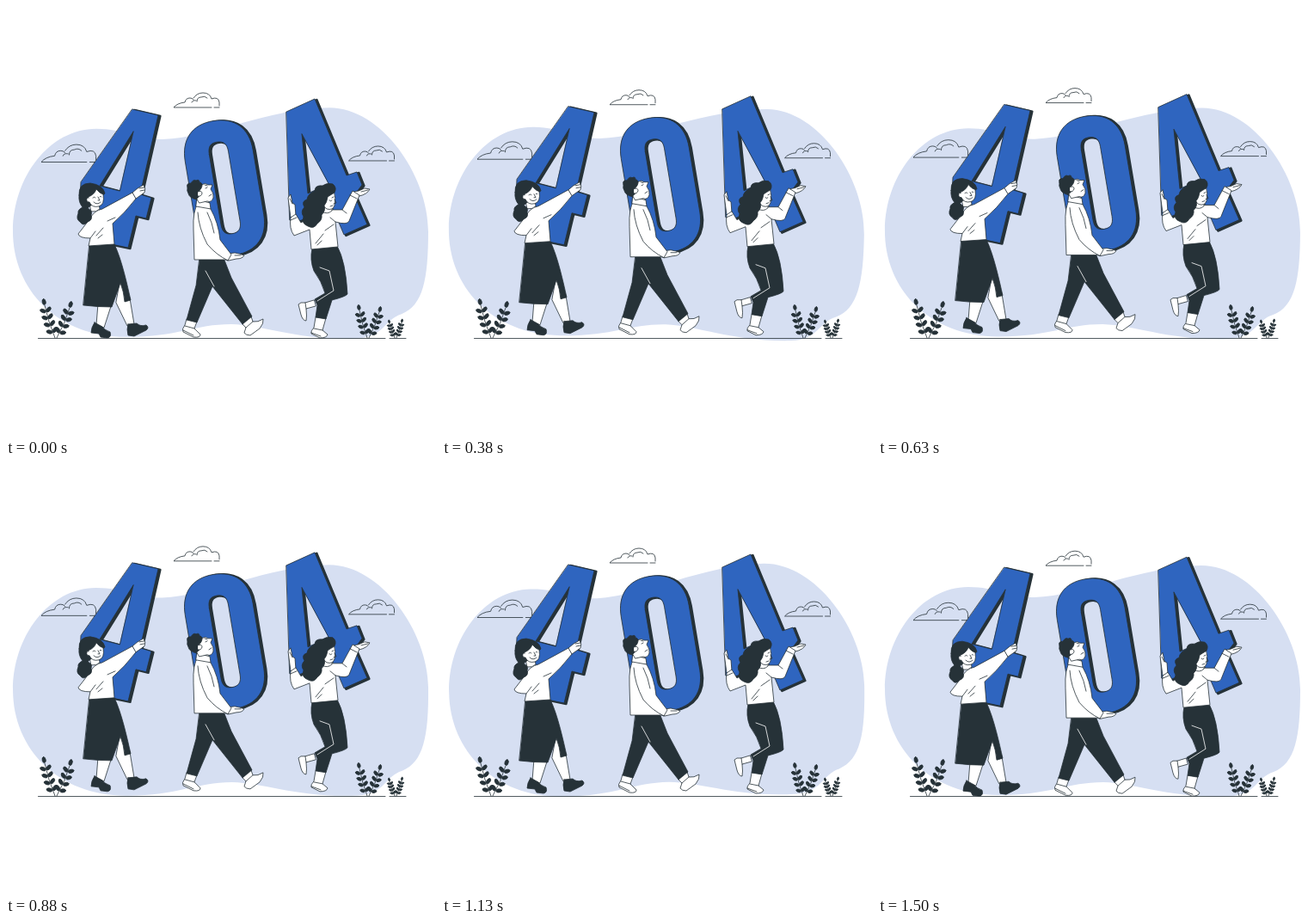
An HTML page that plays this animation: 500 by 500 pixels, repeating every 1540 ms.

```html
<!DOCTYPE html>
<html lang="en">
<head>
<meta charset="utf-8">
<title>404</title>
<style>
html, body { margin: 0; height: 100%; overflow: hidden; background: #fff; }
svg { display: block; width: 100vw; height: 100vh; }
.ink { fill: #263238; stroke: #263238; }
.side { fill: #263238; stroke: #263238; stroke-width: 2.4; }
.face { fill: #2f65bf; stroke: #263238; }
.skin { fill: #fff; stroke: #263238; }
.line { fill: none; stroke: #263238; }
.seam { fill: none; stroke: #fff; }
#cloud path { vector-effect: non-scaling-stroke; }
</style>
</head>
<body>
<svg viewBox="0 0 500 500" stroke-width=".8" stroke-linecap="round" stroke-linejoin="round">
  <defs>
    <g id="cloud" class="line">
      <path d="M239 118H195Q199 113 208 112Q209 107 214 107Q217 107 218 109M218 107Q222 101 229 101Q237 101 239 108Q247 105 248 112V116M242 118H248"/>
      <path d="M216 112Q217 109 221 110M222 111Q222 106 227 106Q231 104 234 107"/>
    </g>
    <path id="left4" fill-rule="evenodd" d="M147 120L177 127L156 219L169 223L163 247L151 244L142 281L113 275L119 243L86 224L87 205ZM148 146L109 209L132 215Z"/>
    <path id="right4" fill-rule="evenodd" d="M326 123L359 108L396 197L408 193L414 208L405 220L420 254L393 266L379 233L337 252L330 249ZM344 149L351 218L375 207Z"/>
    <path id="zero" fill-rule="evenodd" d="M-40-38C-40-64-25-79 0-79S40-64 40-38V38C40 64 25 79 0 79S-40 64-40 38ZM-11-41V41C-11 50-8 54 0 54S11.500 50 11.500 41V-41C11.500-50 8-54 0-54S-11-50-11-41Z"/>
  </defs>

  <path id="blob" fill="#d6dff2" d="M8 262C8 200 50 143 105 143C140 143 150 156 182 155C238 153 305 119 376 118C436 118 491 196 491 262C491 318 485 348 460 358C440 364 440 385 408 386.500C340 389 300 371 262 370C220 370 200 385 140 385C60 385 8 330 8 262Z"/>

  <path class="line" d="M37.500 386.500H441M446 386.500H465"/>
  <g id="plants"></g>

  <g id="float">
    <use href="#cloud"/>
    <use href="#cloud" transform="translate(-193 39.900) scale(1.2)"/>
    <use href="#cloud" transform="translate(203.500 62)"/>

    <use href="#left4" class="side" x="2.400" y="1"/>
    <use href="#left4" class="face"/>
    <use href="#right4" class="side" x="2.400" y="1"/>
    <use href="#right4" class="face"/>
    <g transform="translate(254 211.500) rotate(-9.500)">
      <use href="#zero" class="side" x="2.400" y="1"/>
      <use href="#zero" class="face"/>
    </g>

    <g id="woman-in-skirt">
      <path class="skin" d="M107 346L105 371L114 374L123 346ZM128 345L141 372L149 370L144 340L133 318Z"/>
      <path class="ink" d="M97 279L126 277C135 296 141 325 145 342L138 344Q137 332 133 322L123 350Q106 350 90 348Z"/>
      <path class="ink" d="M103 368L112 373Q115 377 121 379Q123 385 118 386L110 385L108 381L99 380Q99 374 103 368ZM142 370L152 369Q156 373 163 371Q167 374 163 377L149 384L142 383Q140 376 142 370Z"/>
      <path class="skin" d="M147 217L153 212L160 208Q163 213 161 217L151 224Z"/>
      <path class="line" d="M155 212L161 211M156 215L161 214"/>
      <path class="skin" d="M98 247L84 265Q85 270 98 270L96 279L126 277L124 253Q138 241 151 224L147 217L112 236Q102 238 98 247Z"/>
      <path class="line" d="M98 270L104 262M118 250L127 246M105 267L113 258M107 270L112 266"/>
      <path class="skin" d="M97 230L99 239Q105 240 109 236L108 230Z"/>
      <path class="ink" d="M85 220Q84 206 98 206Q113 208 115 218L111 222L95 235Q101 238 99 243Q101 249 95 251Q90 257 86 251Q81 248 84 241Q83 237 89 234Q84 228 85 220Z"/>
      <path class="skin" d="M96 222Q103 219 105 213Q109 218 113 219Q115 231 108 233Q100 235 97 228Q93 228 94 224Q95 222 96 223Z"/>
      <path class="line" d="M101 223Q103 221 104 223M109 222Q110 220 111 222M107 222L109 226H107M102 228Q106 232 110 228"/>
    </g>

    <g id="man">
      <path class="skin" d="M210 364L208 371Q204 376 206 379L218 385Q226 386 226 382L219 375L222 367ZM275 370L279 374L277 380Q279 383 284 383L295 375Q300 369 299 364Q293 368 287 367L285 361Z"/>
      <path class="line" d="M208 372L219 375M279 374L287 367M206 377L218 383"/>
      <path class="ink" d="M225 295L253 293L262 316L286 361L275 370L240 326L222 368L210 365L221 325Z"/>
      <path class="seam" d="M232 308L242 326"/>
      <path class="skin" d="M258 288L266 287Q272 288 277 290Q275 294 268 294L259 296Z"/>
      <path class="line" d="M266 290H273"/>
      <path class="skin" d="M223 230Q217 238 218 260L219 295L255 295L258 296L262 289L249 272Q247 252 238 236Z"/>
      <path class="line" d="M223 240Q224 258 234 277Q244 289 258 296M234 240Q240 252 242 264"/>
      <path class="skin" d="M222 220L222 231L236 234L236 226Z"/>
      <path class="skin" d="M222 225L237 229L238 236L221 233Z"/>
      <path class="skin" d="M219 219L227 208Q232 205 235 208L240 208L238 213Q242 218 241 223Q239 229 234 227L225 229Z"/>
      <path class="ink" d="M211 211Q209 206 215 206Q218 201 221 203Q225 201 225 205Q230 206 227 212L224 216L225 221L221 225Q213 223 212 218Q210 215 211 211Z"/>
      <path class="skin" d="M223 216Q228 214 228 218Q227 222 223 221Z"/>
      <path class="line" d="M232 212L234 211M231 208L234 209M236 221L239 219"/>
    </g>

    <g id="woman-in-trousers">
      <path class="skin" d="M358 342L348 345Q342 344 340 347L343 359Q345 366 349 366Q350 361 349 352L360 349ZM360 362L358 374Q354 378 355 381L365 386Q373 386 374 382L368 377L372 363Z"/>
      <path class="line" d="M348 345L349 352M358 375L368 377M355 380L366 384"/>
      <path class="ink" d="M356 282L385 279Q395 297 397 335Q395 338 379 342L372 364L360 362L362 348L359 341L371 334Q367 320 358 308Q353 295 356 282Z"/>
      <path class="seam" d="M365 304L376 308L381 331L362 343"/>
      <path class="skin" d="M331 246L328 223L331 219L333 229L336 231L337 244ZM404 216L410 215L417 212L423 213Q420 219 411 221Z"/>
      <path class="line" d="M413 216L421 214M330 224L333 230"/>
      <path class="skin" d="M331 246L337 242L343 252L358 242L380 237L391 237L403 215L411 220L399 250Q397 255 383 251L386 280L355 283L353 260L335 267Q329 259 331 246Z"/>
      <path class="line" d="M331 249L338 246M400 220L408 224M391 237L396 241M383 251L377 246M360 276L369 265M362 278L367 273M371 261L381 254"/>
      <path class="skin" d="M368 230L367 239Q374 243 379 238V230Z"/>
      <path class="skin" d="M368 216L381 214Q384 224 382 232Q380 238 373 236L367 231Z"/>
      <path class="ink" d="M359 215Q359 208 368 209Q373 205 380 207Q385 211 382 217Q377 220 374 222Q373 229 370 232Q372 238 367 243Q368 249 362 253Q358 260 351 256Q343 253 346 245Q342 239 347 234Q343 227 350 225Q351 218 359 215Z"/>
      <path class="line" d="M379 223L381 222M376 226Q378 228 379 226M382 225L384 229L381 230M377 233L380 232"/>
    </g>
  </g>
</svg>
<script>
const LOOP = 1540, LEAD = 30;
const byId = id => document.getElementById(id);

// A curved stem from (x, 386) to (tx, ty) with n pairs of leaves.
function stem(x, tx, ty, n, size) {
  const base = 386, cx = (x + 2 * tx) / 3, cy = (base + ty) / 2;
  let out = `<path class="line" d="M${x} ${base}Q${cx} ${cy} ${tx} ${ty}"/>`;
  const leaf = (px, py, angle) =>
    `<ellipse class="ink" stroke="none" cx="${size * 1.2}" rx="${size}" ry="${size * .6}" transform="translate(${px} ${py}) rotate(${angle})"/>`;
  for (let i = 0; i <= n; i++) {
    const u = .16 + .84 * i / n, v = 1 - u;
    const px = v * v * x + 2 * u * v * cx + u * u * tx;
    const py = v * v * base + 2 * u * v * cy + u * u * ty;
    const dir = Math.atan2(v * (cy - base) + u * (ty - cy), v * (cx - x) + u * (tx - cx)) * 180 / Math.PI;
    out += i === n ? leaf(px, py, dir) : leaf(px, py, dir - 55) + leaf(px, py, dir + 55);
  }
  return out;
}

byId('plants').innerHTML =
  stem(57, 45, 348, 4, 3.4) + stem(59, 74, 351, 4, 3.4) +
  stem(420, 411, 354, 4, 2.9) + stem(422, 434, 356, 4, 2.9) +
  stem(452, 446, 369, 4, 1.7) + stem(454, 460, 368, 4, 1.7);

function draw(now) {
  const phase = (now + LEAD) % LOOP / LOOP;
  const wave = p => 1 - Math.abs(2 * (p % 1) - 1);
  const rise = 6.6 * wave(phase) - .25;
  const tilt = 2 * wave(phase + .25) - 1;
  byId('float').setAttribute('transform', `translate(0 ${-rise})`);
  byId('blob').setAttribute('transform', `rotate(${tilt} 250 253)`);
}

const start = performance.now();
function tick() {
  draw(performance.now() - start);
  requestAnimationFrame(tick);
}
tick();
</script>
</body>
</html>
```
